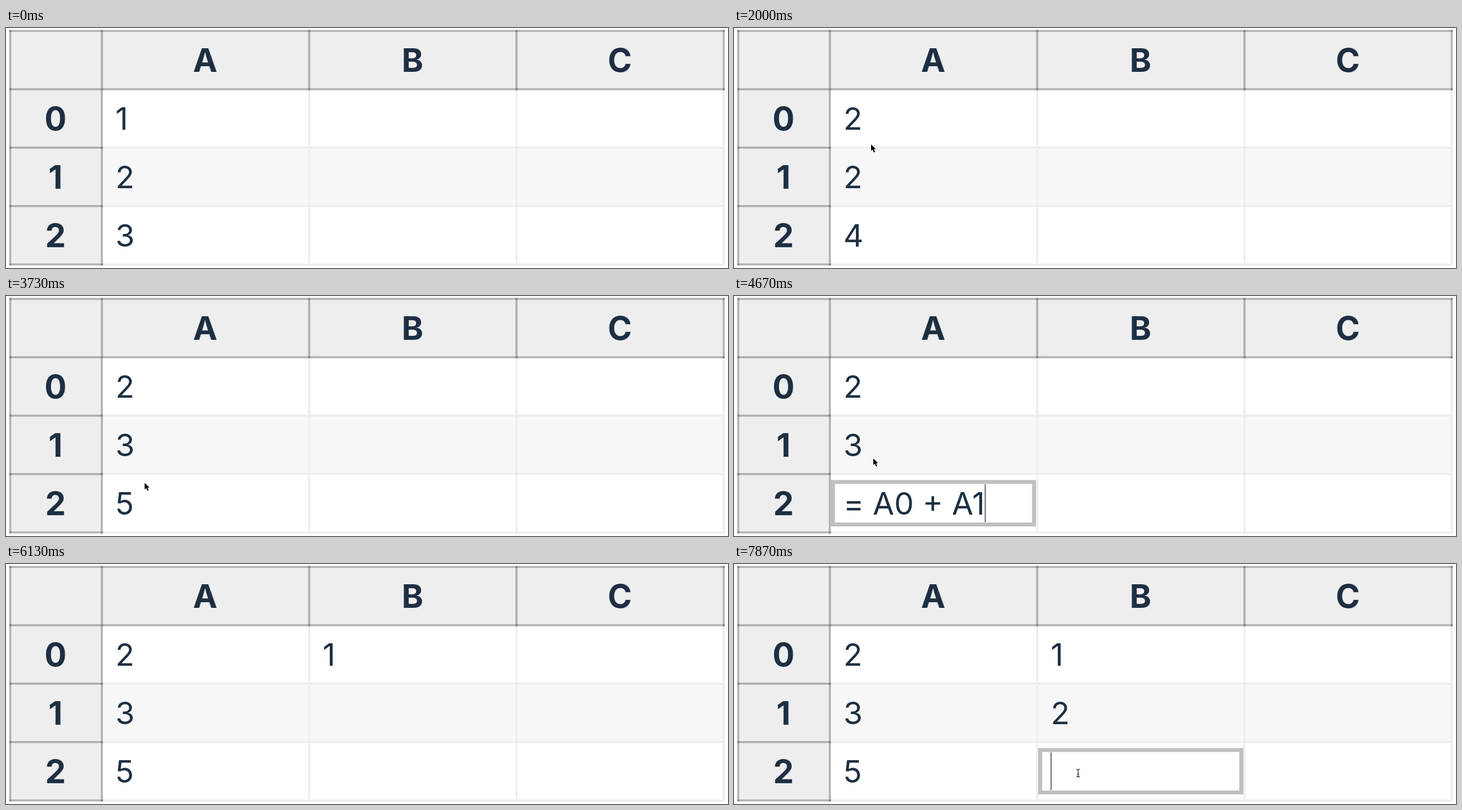
An HTML page for the animation above (8 s loop, 1280 by 427 pixels).

```html
<!DOCTYPE html>
<html lang="en">
<head>
<meta charset="utf-8">
<title>Cells</title>
<style>
  html, body { margin: 0; width: 100%; height: 100%; overflow: hidden; background: #fff; }
  svg { display: block; width: 100%; height: 100%; }
  text { font-family: Inter, "Liberation Sans", sans-serif; font-size: 55.1px; fill: #1d2f42; white-space: pre; }
  .head { font-size: 58px; font-weight: 700; text-anchor: middle; }
</style>
</head>
<body>
<svg id="stage" viewBox="0 0 1280 427"></svg>
<script>
const NS = "http://www.w3.org/2000/svg";
const stage = document.getElementById("stage");
const COL = 367.5, ROW = 103.9;
const X = [7.5, ...[0, 1, 2, 3].map(i => 170 + i * COL)];
const Y = [0, 1, 2, 3, 4].map(i => 5.1 + i * ROW);
const LINE = 3.6, DARK = "rgba(0,0,0,.27)", LIGHT = "#eee";
const TICK = 1000 / 15, TICKS = 120, BLINK = 6;

function set(el, attrs) {
  for (const k in attrs) el.setAttribute(k, attrs[k]);
  return el;
}
const add = (tag, attrs) => stage.appendChild(set(document.createElementNS(NS, tag), attrs));
const show = (el, on) => el.setAttribute("visibility", on ? "visible" : "hidden");
const rect = (x, y, width, height, fill) => add("rect", { x, y, width, height, fill });
const hline = (x0, x1, y, fill) => rect(x0 - LINE / 2, y - LINE / 2, x1 - x0 + LINE, LINE, fill);
const vline = (x, y0, y1, fill) => rect(x - LINE / 2, y0 - LINE / 2, LINE, y1 - y0 + LINE, fill);

// Grid
rect(X[1], Y[2], X[4] - X[1], ROW, "#f7f7f7");
for (let i = 2; i < 5; i++) {
  hline(X[1], X[4], Y[i], LIGHT);
  vline(X[i], Y[1], Y[4], LIGHT);
}
rect(X[0], Y[0], X[4] - X[0], ROW, LIGHT);
rect(X[0], Y[0], X[1] - X[0], Y[4] - Y[0], LIGHT);
Y.forEach((y, i) => hline(X[0], i < 2 ? X[4] : X[1], y, DARK));
X.forEach((x, i) => vline(x, Y[0], i < 2 ? Y[4] : Y[1], DARK));

function heading(label, x, row) {
  add("text", { x, y: 78.3 + row * ROW, class: "head" }).textContent = label;
}
[..."ABC"].forEach((c, i) => heading(c, X[i + 1] + COL / 2 - 0.5, 0));
[..."012"].forEach((c, i) => heading(c, 87.7, i + 1));

// Editor, cell texts and pointers
const mark = rect(0, 0, 10, 68.5, "#a8cdfa");
const box = add("rect", { width: 356.6, height: 75.6, fill: "none", stroke: "rgba(0,0,0,.25)", "stroke-width": 7 });
const cells = {};
["A0", "A1", "A2", "B0", "B1", "B2"].forEach((name, i) => {
  const x = 194 + Math.floor(i / 3) * COL, y = 181.1 + (i % 3) * 103.8;
  cells[name] = { x, left: x - 22.2, top: y - 61.3, el: add("text", { x, y }) };
});
const caret = rect(0, 0, 1.3, 67, "#1a2530");
const arrow = add("path", {
  d: "M0 0V11.8L2.7 9.3L4.9 14.2L7 13.3L4.8 8.5H8.4Z",
  fill: "#000", stroke: "#fff", "stroke-width": 1, "paint-order": "stroke"
});
const beam = add("path", {
  d: "M-3-6.8Q0-6.8 0-4.8Q0-6.8 3-6.8M0-5V5M-3 6.8Q0 6.8 0 4.8Q0 6.8 3 6.8M-1.6 2H1.6",
  fill: "none", stroke: "#111", "stroke-width": 1.2
});

// Edits in ticks: focus, optional selection, optional typing, leaving the cell
const edits = [
  { cell: "A0", focus: 8, pick: 13, type: 17, text: "2", leave: 24 },
  { cell: "A1", focus: 34, pick: 42, type: 48, text: "3", leave: 50 },
  { cell: "A2", focus: 58, leave: 72 },
  { cell: "A1", focus: 72, leave: 80 },
  { cell: "B0", focus: 80, type: 89, text: "1", leave: 92 },
  { cell: "B1", focus: 101, type: 105, text: "2", leave: 109 },
  { cell: "B2", focus: 118, leave: TICKS }
];

// Pointer moves: each goes on from the end of the one before; typing hides the pointer
const home = { end: 1, x: 744, y: 337 };
const moves = [
  { start: 1, end: 2, x: 392, y: 311 },
  { start: 3, end: 8, x: 278, y: 181 },
  { start: 9, end: 12, x: 236, y: 172 },
  { start: 29, end: 30, x: 243, y: 207 },
  { start: 30, end: 35, x: 229, y: 254 },
  { start: 53, end: 59, x: 254, y: 371 },
  { start: 66, end: 70, x: 247, y: 289 },
  { start: 73, end: 80, x: 684, y: 177 },
  { start: 96, end: 102, x: 663, y: 264 },
  { start: 111, end: 116, x: 610, y: 372 }
];

function pointerAt(k) {
  if (k < home.end) return null;
  const i = moves.findLastIndex(m => m.start < k);
  if (i < 0) return home;
  const to = moves[i], from = moves[i - 1] || home;
  if (edits.some(e => e.type > to.start && e.type <= k)) return null;
  const f = Math.min(1, (k - to.start) / (to.end - to.start));
  const ease = 1 - (1 - f) ** 1.6;
  return { x: from.x + (to.x - from.x) * ease, y: from.y + (to.y - from.y) * ease };
}

function valuesAt(k, when) {
  const v = { A0: "1", A1: "2" };
  for (const e of edits) if (e[when] <= k && e.text) v[e.cell] = e.text;
  return v;
}

function draw(k) {
  const edit = edits.find(e => k >= e.focus && k < e.leave);
  const typed = valuesAt(k, "type"), saved = valuesAt(k, "leave");
  typed.A2 = edit && edit.cell === "A2" ? "= A0 + A1" : String(+saved.A0 + +saved.A1);
  for (const n in cells) cells[n].el.textContent = typed[n] || "";

  const c = edit && cells[edit.cell];
  const hasTyped = edit && k >= edit.type;
  const picked = edit && k >= edit.pick && !hasTyped;
  const since = edit ? k - (hasTyped ? edit.type : edit.focus) : 0;
  show(box, c);
  show(mark, picked);
  show(caret, c && !picked && since % (2 * BLINK) < BLINK);
  if (c) {
    const width = c.el.textContent ? c.el.getComputedTextLength() : 0;
    set(box, { x: c.left + 3.5, y: c.top + 3.5 });
    set(mark, { x: c.x, y: c.top + 10.3, width });
    set(caret, { x: c.x + width, y: c.top + 7.8 });
  }

  const p = pointerAt(k);
  const inside = p && c && p.x > c.left && p.x < c.left + 364 && p.y > c.top && p.y < c.top + 83;
  show(arrow, p && !inside);
  show(beam, inside);
  if (p) set(inside ? beam : arrow, { transform: `translate(${p.x} ${p.y})` });
}

const start = performance.now();
let last = 0;
function frame(now) {
  const k = Math.floor(Math.max(0, now - start) / TICK + 0.05) % TICKS;
  if (k !== last) draw(last = k);
  requestAnimationFrame(frame);
}
draw(0);
requestAnimationFrame(frame);
</script>
</body>
</html>
```
